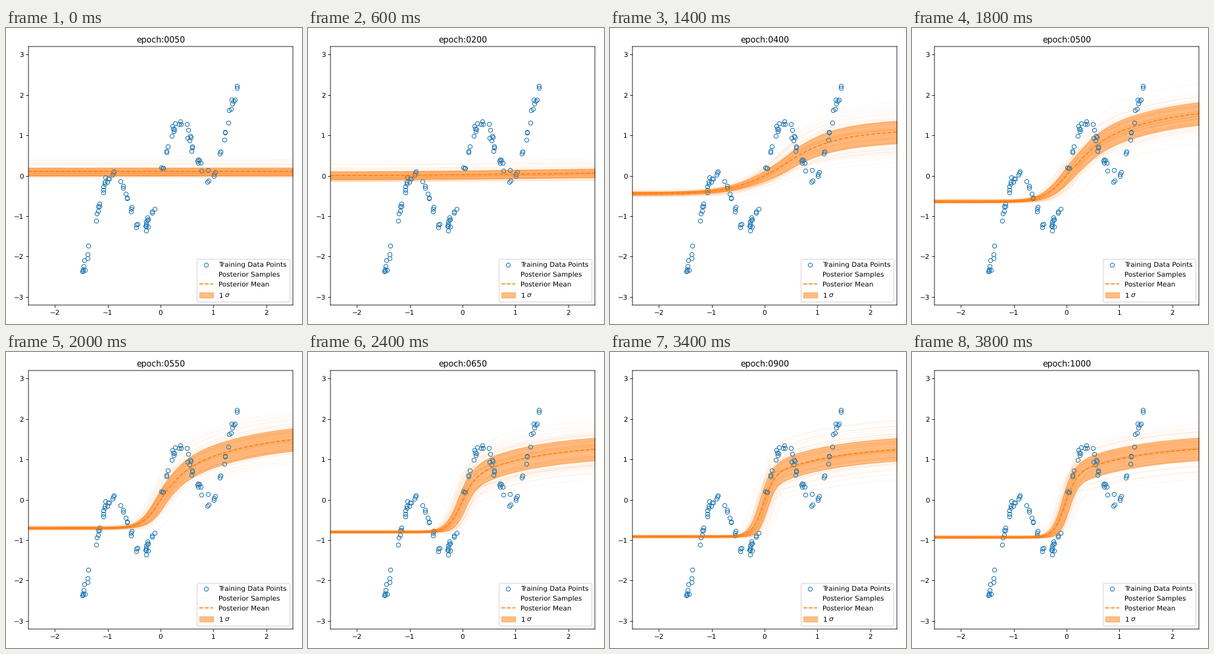
A matplotlib script that plays this animation: 450x450 px, repeating every 4000 ms.

```python
import numpy as np
import matplotlib.pyplot as plt
from matplotlib.animation import FuncAnimation

SIZE, DPI = 450, 75
LEFT, RIGHT, TOP, BOTTOM = 34.1, 436.1, 28.1, 421.1
XLIM, YLIM = 2.5, 3.2
FRAMES, INTERVAL, STEP = 20, 200, 50
SAMPLES = 100
# Spots where the training inputs crowd together
HUBS = [-1.48, -1.43, -1.36, -1.21, -1.18, -1.08, -1.06, -.99, -.90, -.73,
        -.64, -.55, -.45, -.29, -.26, -.24, -.14, .02, .11, .22, .26, .37,
        .50, .56, .59, .68, .75, .89, 1.01, 1.14, 1.20, 1.30, 1.36, 1.42]

plt.rcParams["text.hinting"] = "none"
x = np.linspace(-XLIM, XLIM, 300)


def sigmoid(t):
    return 1 / (1 + np.exp(-t))


def softplus(t, soft):
    return soft * np.logaddexp(0, t / soft)


def training_data():
    rng = np.random.default_rng(5)
    tx = np.repeat(HUBS, 3)
    tx = tx + rng.uniform(-.025, .025, tx.size)
    return tx, tx + np.sin(5 * tx) + rng.normal(0, .08, tx.size)


def posterior(epoch):
    """Return mean, standard deviation and sampled curves."""
    learned = 1 - np.exp(-softplus(epoch - 270, 25) / 215)
    rest = 1 - learned

    # A smooth step that sharpens and sinks, followed by a slow rise
    low = -.01 + .11 * np.exp((50 - epoch) / 70) - .95 * learned
    height = (.93 + .8 * learned**2) * sigmoid((epoch - 240) / 18)
    mid = 1.05 * sigmoid((360 - epoch) / 25) - .02 * learned**4
    width = .11 + 1.3 * rest**2.3
    late = (.62 * sigmoid((epoch - 400) / 30)
            + .5 * np.exp(-((epoch - 500) / 110)**2))
    step = sigmoid((x - mid) / width)
    tail = late * (1 - np.exp(-softplus(x - .3, .1) / 1.3))
    mean = low + height * step + tail

    # Spread of the floor, the plateau and the place of the step
    s_low = .02 + .08 * rest**2.5
    s_top = .02 + .26 * sigmoid((epoch - 265) / 30)
    s_mid = .32 * learned * (1 - .72 * learned)
    slope = height * step * (1 - step) / width
    sd = np.sqrt(s_low**2 + (s_top * step)**2 + (s_mid * slope)**2)

    rng = np.random.default_rng(epoch)
    z = np.clip(rng.normal(size=(3, SAMPLES, 1)), -2.6, 2.6)
    z[0] += .18 * rest**2 * (z[0]**2 - 1)
    shifted = sigmoid((x - mid - s_mid * z[1]) / (.85 * width))
    curves = low + s_low * z[0] + height * shifted + s_top * z[2] * step + tail
    return mean, sd, curves


def outline(mean, sd):
    upper = np.column_stack([x, mean + sd])
    lower = np.column_stack([x, mean - sd])
    return [np.vstack([upper, lower[::-1]])]


fig = plt.figure(figsize=(SIZE / DPI, SIZE / DPI), dpi=DPI)
ax = fig.add_axes([LEFT / SIZE, 1 - BOTTOM / SIZE,
                   (RIGHT - LEFT) / SIZE, (BOTTOM - TOP) / SIZE])
ax.set_xlim(-XLIM, XLIM)
ax.set_ylim(-YLIM, YLIM)
for spine in ax.spines.values():
    spine.set_snap(False)
title = ax.set_title("")

ax.plot(*training_data(), "o", mfc="none", mec="C0",
        label="Training Data Points")
samples = [ax.plot(x, 0 * x, color="C1", alpha=.05, lw=1)[0]
           for _ in range(SAMPLES)]
samples[0].set_label("Posterior Samples")
mean_line, = ax.plot(x, 0 * x, "--", color="C1", label="Posterior Mean")
band = ax.fill_between(x, 0 * x, 0 * x, color="C1", alpha=.5,
                       label=r"1 $\sigma$")
ax.legend(loc="lower right")


def update(i):
    epoch = STEP * (i + 1)
    mean, sd, curves = posterior(epoch)
    title.set_text(f"epoch:{epoch:04d}")
    mean_line.set_ydata(mean)
    band.set_verts(outline(mean, sd))
    for line, curve in zip(samples, curves):
        line.set_ydata(curve)
    return [title, mean_line, band, *samples]


anim = FuncAnimation(fig, update, frames=FRAMES, interval=INTERVAL,
                     init_func=lambda: update(0), repeat=True, repeat_delay=0)
plt.show()
```
